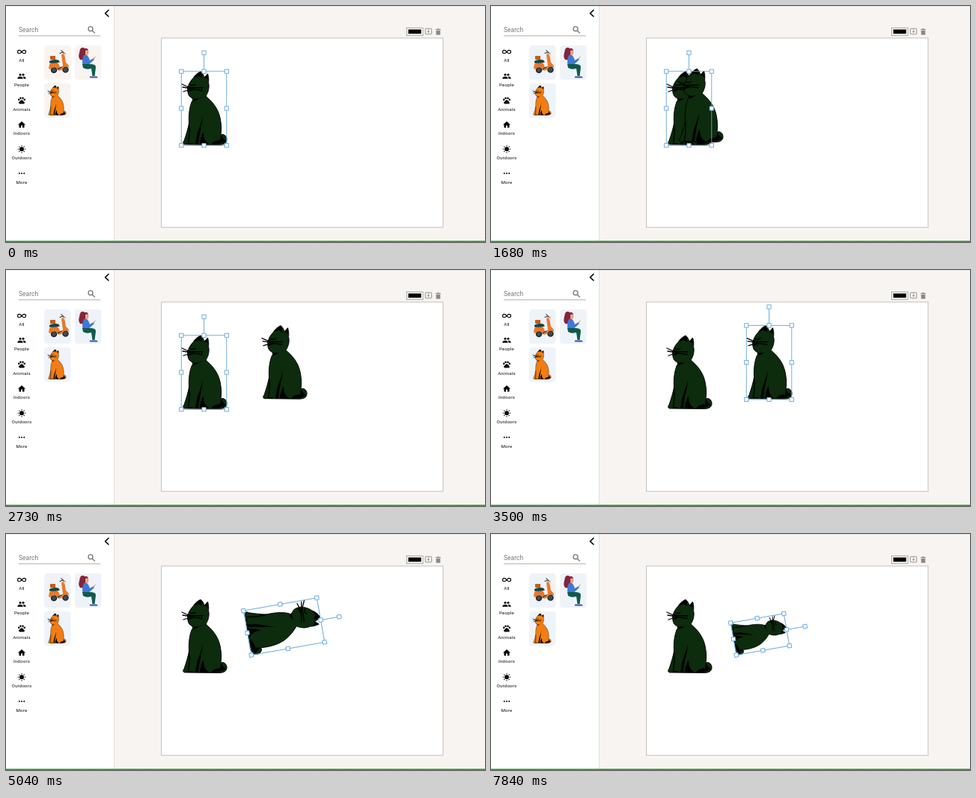
Animation of 640 by 317 pixels, one loop 8000 ms. Source, as an HTML page:

```html
<!DOCTYPE html>
<html lang="en">
<head>
<meta charset="utf-8">
<title>Illustration editor</title>
<style>
html, body { margin: 0; width: 100%; height: 100%; overflow: hidden; background: #fff; }
svg { display: block; width: 100vw; height: 100vh; }
text { font-family: Roboto, Arial, sans-serif; }
.label { font-size: 6.2px; letter-spacing: .03em; text-anchor: middle; fill: #111; }
.line { fill: none; stroke: #000; stroke-linecap: round; stroke-linejoin: round; }
.frame { fill: none; stroke: #62a5dc; stroke-width: .9; }
.grip { fill: #fff; stroke: #62a5dc; stroke-width: .9; }
</style>
</head>
<body>
<svg viewBox="0 0 640 317" preserveAspectRatio="none">
  <defs>
    <g id="cat">
      <path fill="currentColor" stroke="#000" stroke-width=".9" stroke-linejoin="round" d="M260 88C263 90 264 93 265 96L269.5 91C271 96 271 100 270.5 103C272 108 271 115 267 121C274 127 283 136 286 150C288 160 288 167 287 173C291 171 295.5 175 295 180C294.500 185 290 186.500 284 186.500L240 186C236 186.500 236 183 238 181C241 172 243 165 244.500 158C244 148 244.500 138 248 129C249 127 250 125.500 250 124C246 123 243 120 243 115L242.500 111C244 105 246 101 250 97C252 93 256 90 260 88Z"/>
      <path d="M260 88C256 90 253 93 251.500 97Q258 91.500 261.500 97Q263 92 260 88ZM269.500 91L264.500 97Q269 96 270 101ZM248 124Q257 126 266 121.500Q258 124 251 128Z"/>
      <path d="M263 148C261 158 256 168 255 174L253 186H257C258 172 262 160 263 148ZM264 169C260 176 259 183 259 186H272C266 182 264 178 264 169ZM274 186Q276 181 286 180L287 173Q290 179 294 181Q288 186 274 186Z"/>
      <path class="line" stroke-width="1.300" d="M235 105L245 109.500L263 110M236 109L246 110.500M237 115L248 111.500L262 113.500M243 115L251 112M246 105.500Q249 108 253 105M244.500 158Q246 170 243.500 184M243 185H249"/>
    </g>
    <g id="grips"></g>
  </defs>

  <rect width="640" height="317" fill="#fff"/>
  <rect x="144.500" width="496" height="317" fill="#f8f4f1"/>
  <path d="M144.500 0V317" stroke="#dcdad8" stroke-width=".8"/>
  <path d="M0 .2H640" stroke="#cfcfcf" stroke-width=".5"/>
  <rect x="207.700" y="43" width="376.300" height="254.300" fill="#fff" stroke="#bcbab8" stroke-width=".9"/>

  <path class="line" stroke-width="1.600" d="M137 5.500L132.500 9.800L137 14"/>
  <text x="17" y="35" font-size="8.500" fill="#777">Search</text>
  <path d="M17 40H126.500" stroke="#969696" stroke-width=".8"/>
  <g fill="none" stroke="#777" stroke-width="1.300"><circle cx="113" cy="30.700" r="3"/><path d="M115.200 33L118.800 36.500"/></g>

  <g id="menu"></g>

  <g id="tiles">
    <rect x="51" y="53" width="35.500" height="46" rx="4"/>
    <rect x="92" y="53" width="35.500" height="46" rx="4"/>
    <rect x="51" y="104" width="35.500" height="46" rx="4"/>
  </g>

  <g id="scooter">
    <g fill="#4a4a4a" stroke="#1d2a2c" stroke-width="1.500"><circle cx="64" cy="86" r="3.500"/><circle cx="79.500" cy="85.500" r="3.500"/></g>
    <path fill="#e8792b" d="M58 78Q63 74 70 77L72 82Q74 83 76 80L74 66Q75 63 78 64L80 76Q84 79 84.500 83Q80 79 76 84Q73 88 69 86Q67 81 62 83Q59 86 57 84Z"/>
    <path fill="#17453e" d="M58 74Q63 71 70 72.500L72 75.500Q65 77.500 58 76.500Z"/>
    <path fill="#c65b1c" d="M59 67H66V72H59Z"/>
    <path class="line" style="stroke:#283538" stroke-width="1.100" d="M72 63.500L76 62L79 64M74 59.500L76 62M69 85L74 82"/>
    <circle cx="78.500" cy="65" r="1.700" fill="#f3d29d"/>
  </g>

  <g id="reader">
    <path fill="#84243a" d="M99 58Q102 54 105 57Q110 56 110 61L106 66Q104 74 99 72Q96 68 98 63Z"/>
    <path fill="#e9a48c" d="M106 60Q110 58 110.500 62L109.500 66L106 67Z"/>
    <path fill="#3f78d6" d="M104 66Q108 65 110 68L112 73L117 70L118 72L112 77.500L111 79H102.500Q101 72 104 66Z"/>
    <path class="line" style="stroke:#e9a48c" stroke-width="1.300" d="M116.500 71L119 68.500"/>
    <path fill="#105a4c" d="M102 78H112Q120 78 120 82L118.500 94H115.500L114 84Q107 86 103 83Z"/>
    <path fill="#2e56a8" d="M112 94.500H120Q123 95 122.500 96.500H112Z"/>
  </g>
  <use href="#cat" color="#f27d12" transform="translate(55.500 106.800) scale(.405) translate(-234 -88)"/>

  <rect x="535.300" y="29.300" width="21.700" height="10.400" fill="#fff" stroke="#8b9488" stroke-width=".8"/>
  <rect x="537.500" y="31.500" width="17.200" height="5.800"/>
  <g fill="none" stroke="#8c8a88" stroke-width=".9"><rect x="560.300" y="30.300" width="8.400" height="7.500" rx=".8"/><path d="M564.500 31.500V35.500M562.900 34L564.500 35.700L566.100 34"/></g>
  <path fill="#8c8a88" d="M574 31H576L576.500 30.300H578.500L579 31H581V32H574ZM574.700 32.700H580.300V38.700H574.700Z"/>

  <use href="#cat" color="#0d2b0d"/>
  <g id="copy"><g id="copySize"><use href="#cat" color="#0d2b0d" transform="translate(-264.500 -137.500)"/></g></g>
  <g id="select"></g>

  <path d="M0 316.200H640" stroke="#0a8a12" stroke-width="1.600"/>
  <path d="M0 316.200H640" stroke="#35d83a" stroke-width="1.200" stroke-dasharray="1.500 1.500"/>
</svg>

<script>
const $ = id => document.getElementById(id);
const W = 30.25, H = 49.75, LOOP = 8000, TICK = 70;

const dots = (...list) => list.map(([x, y, r]) => `<circle cx="${x}" cy="${y}" r="${r}"/>`).join('');
const shape = d => `<path d="${d}"/>`;
const rays = Array.from({length: 8}, (_, i) =>
  `<path d="M12 1.500V4.500" stroke="#000" stroke-width="2" transform="rotate(${i * 45} 12 12)"/>`).join('');

const items = [
  ['All', '<path class="line" stroke-width="2.200" d="M12 12c-3-3.500-4.600-4.400-6.600-4.400a4.400 4.400 0 0 0 0 8.800c2 0 3.600-.9 6.600-4.400s4.600-4.400 6.600-4.400a4.400 4.400 0 0 1 0 8.800c-2 0-3.600-.9-6.600-4.400"/>'],
  ['People', dots([8, 8, 3], [16, 8, 3]) + shape('M1 19v-2.500c0-2.300 4.700-3.500 7-3.500s7 1.200 7 3.500V19zM17 19h6v-2.500c0-2.300-4.700-3.500-7-3.500l-1 .05c1.200.85 2 2 2 3.450z')],
  ['Animals', dots([4.5, 9.5, 2.5], [9, 5.5, 2.5], [15, 5.5, 2.5], [19.5, 9.5, 2.5]) + shape('M12 10.500c1.300 0 2.200.6 2.900 1.400l2.500 3c1 1 2.500 2.200 2.200 3.900-.3 1.300-1.500 2.200-2.900 2.200-1.500 0-3-.5-4.700-.5s-3.200.5-4.700.5c-1.400 0-2.600-.9-2.900-2.200-.3-1.700 1.200-2.900 2.200-3.900l2.500-3c.7-.8 1.600-1.400 2.900-1.400z')],
  ['Indoors', shape('M10 20v-6h4v6h5v-8h3L12 3 2 12h3v8z')],
  ['Outdoors', dots([12, 12, 5.8]) + rays],
  ['More', dots([5.5, 12, 2], [12, 12, 2], [18.5, 12, 2])]
];
$('menu').innerHTML = items.map(([name, icon], i) => {
  const y = 61.6 + i * 32.65;
  return `<g transform="translate(15 ${y - 6}) scale(.5)">${icon}</g><text class="label" x="21" y="${y + 13.8}">${name}</text>`;
}).join('');

// Linear interpolation through [time, value] pairs.
function track(keys, t) {
  if (t <= keys[0][0]) return keys[0][1];
  for (let i = 1; i < keys.length; i++) {
    const [t0, a] = keys[i - 1], [t1, b] = keys[i];
    if (t < t1) return a + (b - a) * (t - t0) / (t1 - t0);
  }
  return keys[keys.length - 1][1];
}

const dragX = [[1610, 0], [1680, 15], [1750, 40], [1820, 69], [1960, 90], [2310, 107]];
const dragY = [[1610, 0], [1820, -11], [1960, -14], [2310, -13.3]];
const turn = [[4060, 0], [4200, 36], [4340, 58], [4550, 74], [4760, 80]];
const size = [[5250, 1], [5600, .876], [5670, .876], [5740, .78], [5810, .78], [5880, .725]];

function selection(w, h) {
  const grip = (x, y) => `<rect class="grip" x="${x - 2.6}" y="${y - 2.6}" width="5.200" height="5.200"/>`;
  let out = `<path class="frame" d="M${-w} ${-h}H${w}V${h}H${-w}ZM0 ${-h}V${-h - 25}"/>`;
  for (const x of [-1, 0, 1])
    for (const y of [-1, 0, 1])
      if (x || y) out += grip(x * w, y * h);
  return out + grip(0, -h - 25);
}

function draw(ms) {
  const t = Math.floor(ms / TICK) * TICK;
  const k = track([[0, 0], [280, 1]], t);
  const mix = (a, b) => Math.round(a + (b - a) * k);
  $('tiles').setAttribute('fill', `rgb(${mix(248, 238)},${mix(244, 243)},${mix(241, 249)})`);

  const s = track(size, t);
  const cx = 264.5 + track(dragX, t), cy = 137.5 + track(dragY, t);
  // The lower right corner stays put while resizing.
  const place = `translate(${cx} ${cy}) rotate(${track(turn, t)}) translate(${(1 - s) * W} ${(1 - s) * H})`;
  $('copy').setAttribute('transform', place);
  $('copy').setAttribute('visibility', t > 1610 ? 'visible' : 'hidden');
  $('copySize').setAttribute('transform', `scale(${s})`);

  const picked = t >= 2940;
  $('select').setAttribute('transform', picked ? place : 'translate(264.5 137.5)');
  $('select').innerHTML = picked ? selection(W * s, H * s) : selection(W, H);
}

const start = performance.now();
function tick() {
  draw((performance.now() - start) % LOOP);
  requestAnimationFrame(tick);
}
draw(0);
requestAnimationFrame(tick);
</script>
</body>
</html>
```
